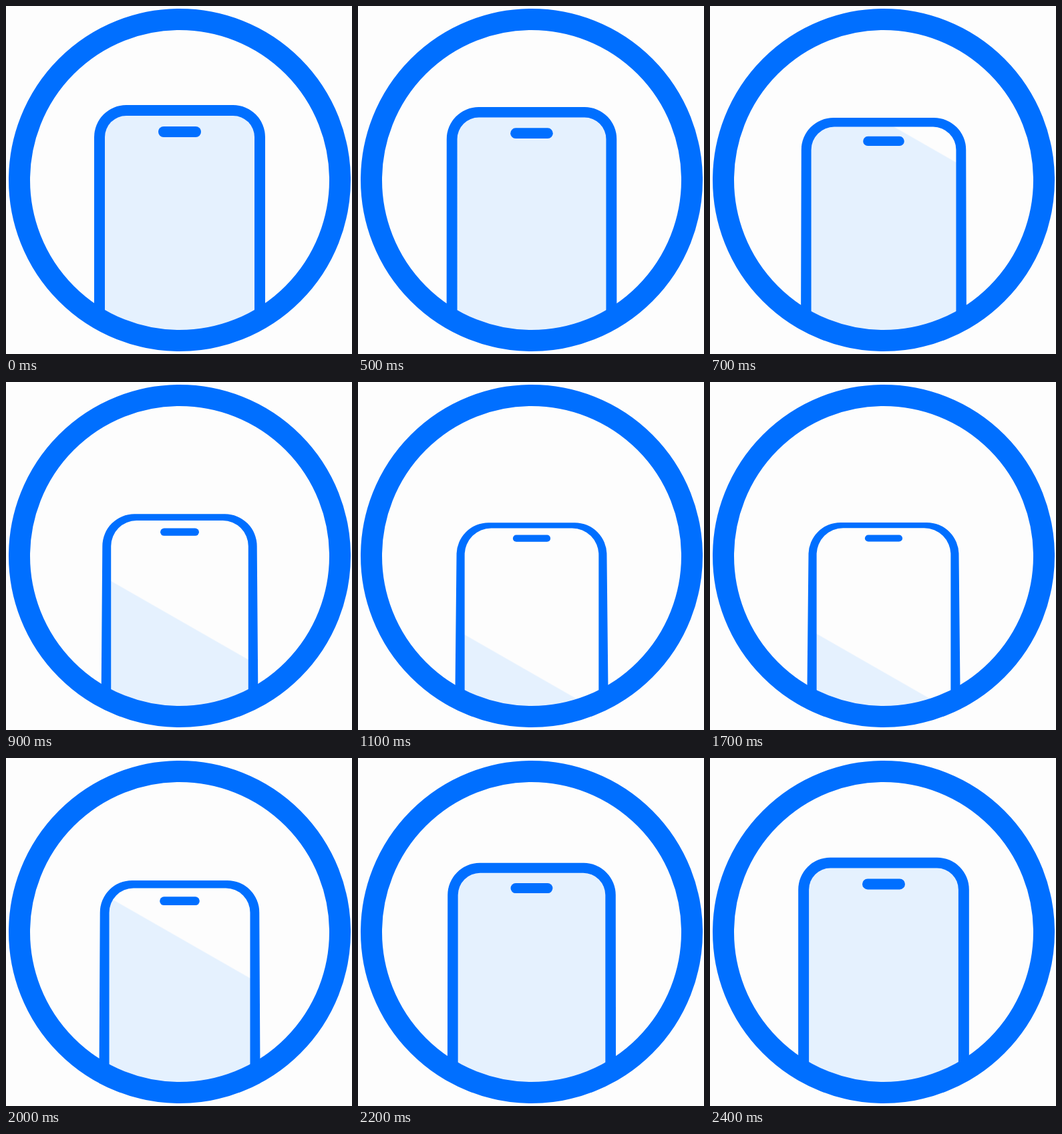
An HTML page that plays this animation: 518 by 520 pixels, repeating every 2.5 s.

```html
<!DOCTYPE html>
<html lang="en">
<head>
<meta charset="utf-8">
<title>Tilting phone</title>
<style>
  html, body { margin: 0; width: 100%; height: 100%; overflow: hidden; background: #fdfdfd; }
  svg { display: block; }
</style>
</head>
<body>
<svg width="518" height="520" viewBox="0 0 518 520">
  <defs>
    <clipPath id="window"><circle cx="260" cy="260" r="240"/></clipPath>
    <linearGradient id="screen" gradientUnits="userSpaceOnUse" x1="160" y1="0" x2="159.2" y2="1.4">
      <stop offset="0" stop-color="#fdfdfd"/>
      <stop offset="1" stop-color="#e5f1fe"/>
    </linearGradient>
  </defs>
  <g clip-path="url(#window)" fill="#006fff">
    <path id="body"/>
    <path id="glass" fill="url(#screen)"/>
    <rect id="notch"/>
  </g>
  <circle cx="260" cy="260" r="240" fill="none" stroke="#006fff" stroke-width="32"/>
</svg>
<script>
const LOOP = 2500, BOTTOM = 516;
const [body, glass, notch, screen] =
  ['body', 'glass', 'notch', 'screen'].map(id => document.getElementById(id));

function ease(t, start, duration) {
  const x = Math.min(1, Math.max(0, (t - start) / duration));
  return x < 0.5 ? 4 * x ** 3 : 1 - 4 * (1 - x) ** 3;
}

// Symmetric about x = 260, rounded at the top, open at the bottom.
function outline(left, top, r, foot) {
  const right = 520 - left, side = top + r;
  return `M${foot} ${BOTTOM}L${left} ${side}A${r} ${r} 0 0 1 ${left + r} ${top}` +
    `H${right - r}A${r} ${r} 0 0 1 ${right} ${side}L${520 - foot} ${BOTTOM}Z`;
}

function draw(now) {
  const t = now % LOOP;
  const tilt = ease(t, 267, 1033) - ease(t, 1490, 1055);
  const mix = (a, b) => a + (b - a) * tilt;

  const inner = mix(148, 160);
  body.setAttribute('d', outline(mix(132, 148), mix(148, 212), 48, mix(132, 145.3)));
  glass.setAttribute('d', outline(inner, mix(164, 220), mix(32, 40), inner));
  screen.setAttribute('gradientTransform', `translate(0 ${mix(-2, 388)})`);

  const x = mix(228, 232), y = mix(180, 230), height = mix(16, 10);
  const box = { x, y, width: 520 - 2 * x, height, rx: height / 2 };
  for (const key in box) notch.setAttribute(key, box[key]);
}

const start = performance.now();
function frame() {
  draw(performance.now() - start);
  requestAnimationFrame(frame);
}
frame();
</script>
</body>
</html>
```
